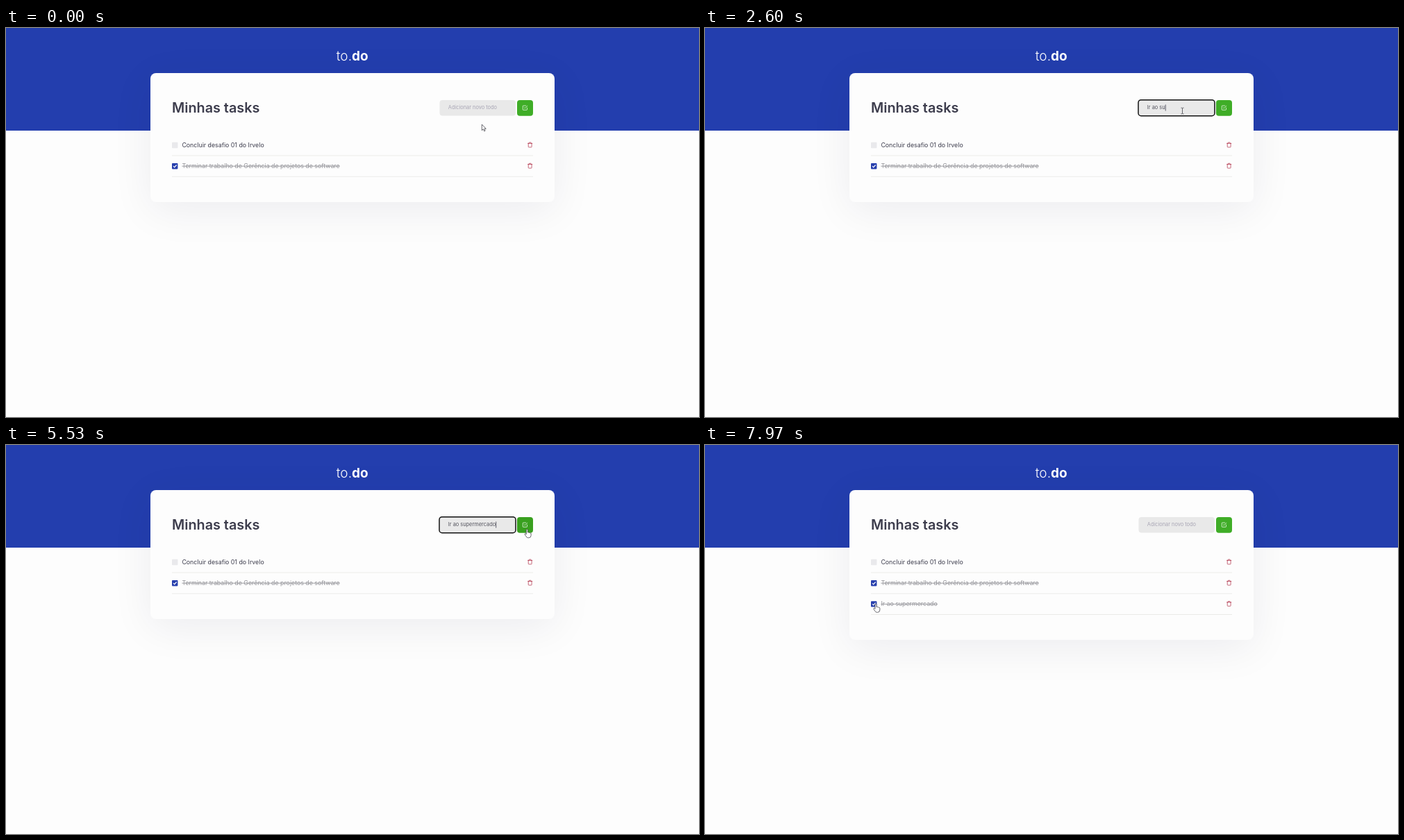
An HTML page for the animation above (8 s loop, 998 px wide and 561 px high).

```html
<!DOCTYPE html>
<html lang="pt">
<head>
<meta charset="utf-8">
<title>to.do</title>
<style>
  html, body { margin: 0; width: 100%; height: 100%; overflow: hidden; background: #fdfdfd; }
  body { position: relative; }
  header { position: absolute; inset: 0 0 auto; height: 147.5px; background: #233eae; }
  #card {
    position: absolute; left: 208px; top: 64.5px; width: 582px; height: 186.5px;
    border-radius: 8px; background: #fdfdfd; box-shadow: 0 12px 60px rgba(20, 20, 50, .07);
  }
  svg { position: absolute; left: 0; top: 0; font-family: Inter, "Open Sans", sans-serif; fill: #3d3d4d; }
  .icon { fill: none; stroke-width: 2; stroke-linecap: round; stroke-linejoin: round; }
  .task { font-size: 8.8px; }
  .done .task { fill: #929298; text-decoration: line-through; }
  .box { fill: #e9e9ec; }
  .done .box { fill: #273fad; }
  .tick { fill: none; stroke: #fff; stroke-width: 1.2; visibility: hidden; }
  .done .tick { visibility: inherit; }
  #field { font-size: 7.4px; }
</style>
</head>
<body>
<header></header>
<div id="card"></div>
<svg width="998" height="561" viewBox="0 0 998 561">
  <g fill="#fff" font-size="19">
    <text x="498" y="47" text-anchor="end" font-weight="300">to.</text>
    <text x="498" y="47" font-weight="700">do</text>
  </g>
  <text x="239" y="122" font-size="19.8" font-weight="600">Minhas tasks</text>

  <rect x="624.5" y="104" width="109.5" height="22.5" rx="4" fill="#e9e9e9"/>
  <rect id="outline" x="624" y="103.7" width="110" height="23" rx="4" fill="none" stroke="#101010" stroke-width="1.5"/>
  <text id="field" x="636.8" y="117.4"></text>
  <rect id="caret" y="110.5" width=".8" height="9"/>

  <rect id="button" x="736" y="104" width="23" height="22.7" rx="4"/>
  <g class="icon" stroke="#fff" transform="translate(743.2 111) scale(.347)">
    <path d="M9 11l3 3L22 4M21 12v7a2 2 0 0 1-2 2H5a2 2 0 0 1-2-2V5a2 2 0 0 1 2-2h11"/>
  </g>

  <g id="rows"></g>

  <g id="cursor" stroke="#44444c" stroke-width=".8" stroke-linejoin="round">
    <path id="arrow" fill="#fff" d="M0 0V8.6L2 6.9L3.4 9.8L4.8 9.2L3.5 6.3H6Z"/>
    <path id="beam" fill="none" d="M-2-4.3h1.4L0-3.8L.6-4.3H2M0-3.8V3.8M-2 4.3h1.4L0 3.8L.6 4.3H2"/>
    <path id="hand" fill="#fff" d="M-1 6V.7Q-1-.5 0-.5T1 .7V4Q2 3.3 2.7 4.4Q3.8 3.8 4.3 4.9Q5.8 4.6 5.8 6V8.4Q5.8 11.8 2.6 11.8H1.4Q-.2 11.8-1.2 9.9L-3.2 7Q-3.2 5.4-1.8 5.8L-1 6.8Z"/>
  </g>
</svg>
<script>
const LOOP = 8000;
const FOCUS = 950, TYPE_START = 1500, KEY_DELAY = 155, SUBMIT = 5700, CHECK = 7630;
const NEW_TASK = 'Ir ao supermercado';
const $ = id => document.getElementById(id);
const show = (node, visible) => node.setAttribute('visibility', visible ? 'visible' : 'hidden');

// Pointer stops: time, x, y
const stops = [
  [0, 685.3, 139], [250, 685.3, 139], [850, 687.5, 119.5], [4900, 687.5, 119.5],
  [5500, 750.3, 122], [6150, 750.3, 122], [6700, 524.7, 253.5],
  [6900, 524.7, 253.5], [7500, 246, 229.5], [LOOP, 246, 229.5]
];

function addRow(label, index) {
  const row = document.createElementNS('http://www.w3.org/2000/svg', 'g');
  row.setAttribute('transform', `translate(0 ${index * 30.2})`);
  row.innerHTML = `
    <rect class="box" x="239" y="164.8" width="8.4" height="8.4" rx=".8"/>
    <path class="tick" d="M241 169l1.6 1.6l3-3.3"/>
    <text class="task" x="253.4" y="172">${label}</text>
    <path class="icon" stroke="#ad273f" transform="translate(750.5 164.3) scale(.347)"
      d="M3 6H21M19 6v14a2 2 0 0 1-2 2H7a2 2 0 0 1-2-2V6m3 0V4a2 2 0 0 1 2-2h4a2 2 0 0 1 2 2v2"/>
    <rect x="239" y="183.6" width="520" height=".8" fill="#e8e8e4"/>`;
  $('rows').append(row);
  return row;
}

const rows = ['Concluir desafio 01 do Irvelo', 'Terminar trabalho de Gerência de projetos de software', NEW_TASK].map(addRow);
rows[1].classList.add('done');

function pointerAt(t) {
  const i = stops.findIndex(stop => stop[0] > t);
  const [t0, x0, y0] = stops[i - 1], [t1, x1, y1] = stops[i];
  const u = (t - t0) / (t1 - t0), ease = u * u * (3 - 2 * u);
  return [x0 + (x1 - x0) * ease, y0 + (y1 - y0) * ease];
}

function drawField(t) {
  const focused = t >= FOCUS && t < SUBMIT;
  const keys = Math.floor((t - TYPE_START) / KEY_DELAY) + 1;
  const count = focused ? Math.max(0, Math.min(NEW_TASK.length, keys)) : 0;
  const lastKey = count ? TYPE_START + (count - 1) * KEY_DELAY : FOCUS;
  const field = $('field');
  field.textContent = count ? NEW_TASK.slice(0, count) : 'Adicionar novo todo';
  field.style.fill = count ? '#55555f' : '#a9a6b5';
  $('caret').setAttribute('x', 637 + (count ? field.getComputedTextLength() : 0));
  show($('caret'), focused && Math.floor((t - lastKey) / 500) % 2 === 0);
  show($('outline'), focused);
}

function drawPointer(t) {
  const [x, y] = pointerAt(t);
  const inBar = y > 104 && y < 126.7;
  const overField = inBar && x > 624 && x < 734;
  const overButton = inBar && x > 736 && x < 759;
  const overBox = x > 238 && x < 248 && y > 224 && y < 234;
  const over = overField ? 'beam' : overButton || overBox ? 'hand' : 'arrow';
  for (const id of ['arrow', 'beam', 'hand']) show($(id), id === over);
  $('cursor').setAttribute('transform', `translate(${x} ${y})`);
  $('button').setAttribute('fill', overButton ? '#39a01f' : '#3fad27');
}

function frame(now) {
  const t = now % LOOP;
  drawField(t);
  drawPointer(t);
  show(rows[2], t >= SUBMIT);
  rows[2].classList.toggle('done', t >= CHECK);
  $('card').style.height = (t >= SUBMIT ? 216.5 : 186.5) + 'px';
  requestAnimationFrame(frame);
}
requestAnimationFrame(frame);
</script>
</body>
</html>
```
